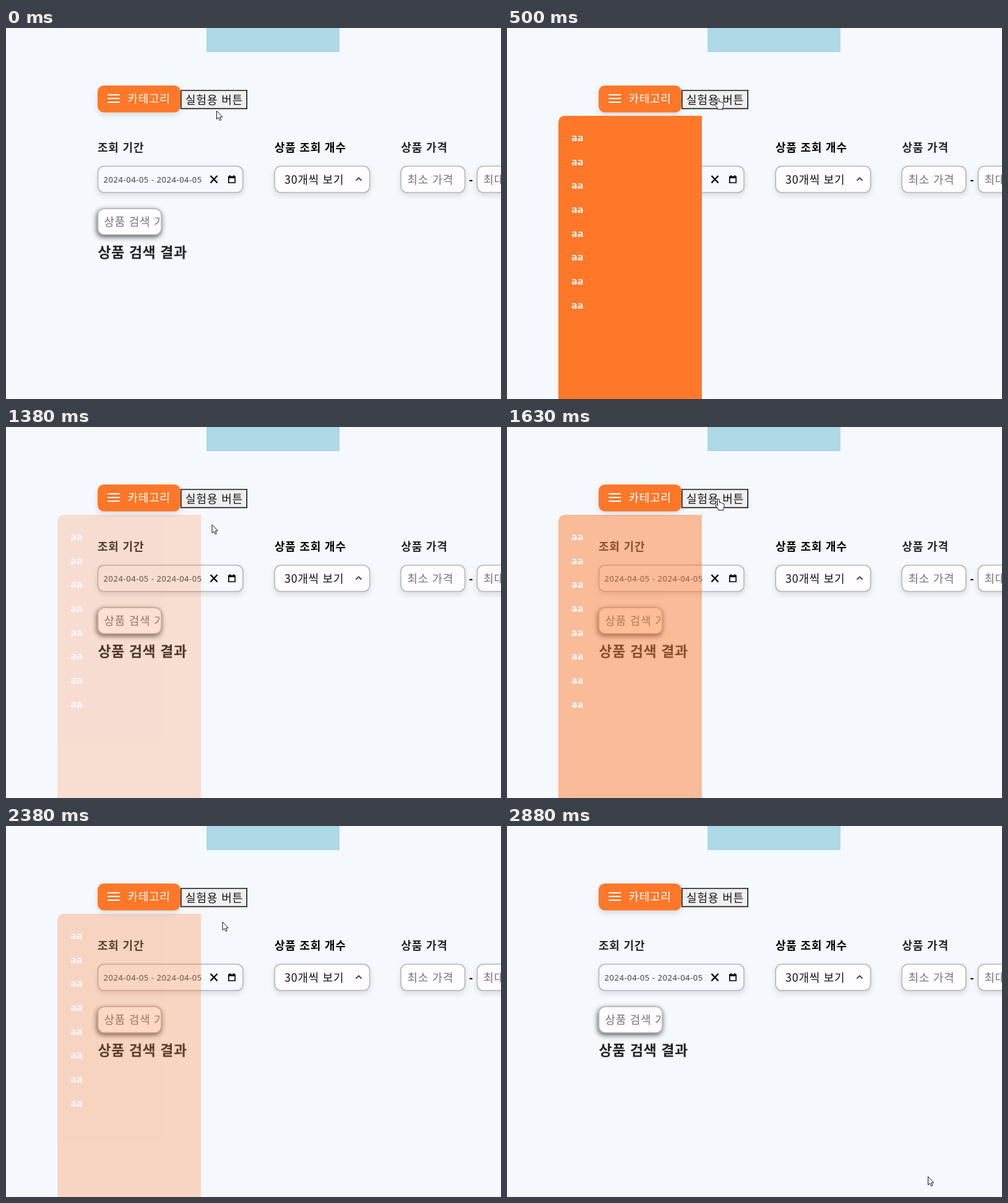
Animation of 800x600 px, one loop 3.01 s. Source, as an HTML page:

```html
<!DOCTYPE html>
<html lang="ko">
<head>
<meta charset="utf-8">
<style>
  html, body { margin: 0; height: 100%; overflow: hidden; background: #f5f9fe; }
  svg { display: block; }
  text { font: 300 18px "Noto Sans CJK KR", "Noto Sans CJK", sans-serif; white-space: pre; letter-spacing: .7px; fill: #111; }
  .label { font-weight: 700; fill: #212529; letter-spacing: .8px; }
  .title { font-size: 23px; letter-spacing: .55px; }
  .hint { fill: #757575; }
  .date { font: 13px "Noto Sans", "Open Sans", sans-serif; fill: #3c4043; letter-spacing: .55px; }
  .dash { font: 600 18px "Noto Sans", sans-serif; }
  .item { font: 600 16px "Noto Sans", "Open Sans", sans-serif; fill: #fff; letter-spacing: 0; }
  .field { fill: #fffdff; stroke: #b4b5b8; stroke-width: 1.6; }
  .soft { filter: drop-shadow(0 4px 5px rgba(0, 0, 0, .12)); }
  .deep { filter: drop-shadow(-1px 3px 4px rgba(0, 0, 0, .65)); }
  .line { fill: none; stroke: #000; stroke-width: 2; }
  .cursor { fill: #fff; stroke: #111; stroke-width: 1; stroke-linejoin: round; }
</style>
</head>
<body>
<svg width="800" height="600" viewBox="0 0 800 600">
  <rect x="324" width="215" height="39" fill="#add8e6"/>

  <rect class="soft" x="148" y="93" width="134" height="43.5" rx="10" fill="#ff782a"/>
  <path class="line" d="M164 108h20M164 114h20M164 120h20" style="stroke:#fff"/>
  <text x="196.5" y="120.500" style="fill:#fff">카테고리</text>

  <rect x="282.800" y="100.800" width="106.400" height="29.600" fill="#efefef" stroke="#111" stroke-width="1.600"/>
  <path class="line" d="M282.800 130V100.800H389" style="stroke:#444;stroke-width:1.600"/>
  <text x="290" y="123" style="letter-spacing:.9px">실험용 버튼</text>

  <text class="label" x="148" y="199.500">조회 기간</text>
  <text class="label" x="434" y="199.500" style="fill:#000">상품 조회 개수</text>
  <text class="label" x="638.500" y="199.500">상품 가격</text>

  <g class="soft">
    <rect class="field" x="148.500" y="223.500" width="234.500" height="42.500" rx="10" style="fill:#f6f9fe"/>
    <rect class="field" x="434.200" y="223.500" width="153.500" height="42.500" rx="10"/>
    <rect class="field" x="638.200" y="223.500" width="103.500" height="42.500" rx="10"/>
    <rect class="field" x="761.500" y="223.500" width="103.500" height="42.500" rx="10"/>
  </g>
  <text class="date" x="157.500" y="249.800">2024-04-05 - 2024-04-05</text>
  <path class="line" d="M330.500 239l11 11.500M341.500 239l-11 11.500" style="stroke-width:2.4"/>
  <path d="M361 238h1.500v1.500h5V238h1.500v1.500h2V251h-12V239.500h2zM360.700 243v6.600h8.700V243z" fill-rule="evenodd"/>
  <text x="450" y="252.300">30개씩 보기</text>
  <path class="line" d="M565.500 246.700l4.500-4.400 4.500 4.400" style="stroke:#444"/>
  <text class="hint" x="648.500" y="251.800">최소 가격</text>
  <text class="dash" x="748.500" y="252">-</text>
  <text class="hint" x="771.500" y="251.800">최대 가격</text>

  <rect class="field deep" x="148.500" y="292.300" width="102.500" height="42" rx="10"/>
  <clipPath id="inner"><rect x="150" y="294" width="98" height="40"/></clipPath>
  <text class="hint" x="158.500" y="320.400" clip-path="url(#inner)">상품 검색 기</text>
  <text class="label title" x="148.500" y="370.500">상품 검색 결과</text>

  <g id="panel">
    <path d="M83 600V152a10 10 0 0 1 10-10H315V600z" fill="#ff782a"/>
  </g>

  <path id="arrow" class="cursor" d="M0 0V13.500L3 10.800 5.200 15.500 7.300 14.600 5.200 10H9.300z"/>
  <path id="hand" class="cursor" d="M-1.500 1.500Q0-.8 1.500 1.500V6.500Q3 5.200 4.200 7 5.700 6 6.700 7.700 8.600 7 9 9.200V13L7.500 16.500V18.500H-.5V17L-4.500 11.800Q-5.500 9.500-3.300 9.500L-1.500 11z"/>
</svg>
<script>
const $ = id => document.getElementById(id);
const LOOP = 3010, TICK = 125, LAST = 23, FADE = 300;
const BUTTON_BOTTOM = 131;

for (let i = 0; i < 8; i++) {
  const item = document.createElementNS("http://www.w3.org/2000/svg", "text");
  item.setAttribute("class", "item");
  item.setAttribute("x", 104);
  item.setAttribute("y", 183 + 38.65 * i);
  item.textContent = "aa";
  $("panel").append(item);
}

// Pointer rests: tick, x, y of the hot spot
const rests = [
  [0, 340.5, 134], [4, 341, 113], [8, 341, 118], [11, 333, 158], [13, 342, 116],
  [15, 342, 126], [17, 342, 126], [19, 350, 155], [21, 350, 158], [LAST, 680.5, 567]
];
// Start times of the fades, in and out by turns
const fades = [170, 1228, 1540, 2246];

const smooth = p => p * p * (3 - 2 * p);

// CSS "ease": cubic-bezier(.25, .1, .25, 1)
function ease(p) {
  const curve = (u, a, b) => 3 * u * (1 - u) ** 2 * a + 3 * u * u * (1 - u) * b + u ** 3;
  let lo = 0, hi = 1;
  for (let i = 0; i < 20; i++) {
    const mid = (lo + hi) / 2;
    if (curve(mid, .25, .25) < p) lo = mid; else hi = mid;
  }
  return curve(lo, .1, 1);
}

function pointer(tick) {
  const i = Math.max(1, rests.findIndex(r => r[0] >= tick));
  const [a, ax, ay] = rests[i - 1], [b, bx, by] = rests[i];
  const p = smooth((tick - a) / (b - a));
  return [ax + (bx - ax) * p, ay + (by - ay) * p];
}

function opacity(time) {
  const done = fades.filter(start => start <= time);
  if (!done.length) return 0;
  const p = ease(Math.min(1, (time - done.at(-1)) / FADE));
  return done.length % 2 ? p : 1 - p;
}

// The screen refreshes eight times a second
function draw(time) {
  const tick = Math.min(LAST, Math.floor(time / TICK));
  const [x, y] = pointer(tick);
  const hover = y < BUTTON_BOTTOM;
  $("panel").style.opacity = opacity(tick * TICK);
  $("arrow").style.display = hover ? "none" : "";
  $("hand").style.display = hover ? "" : "none";
  $(hover ? "hand" : "arrow").setAttribute("transform", `translate(${x} ${y})`);
}

const start = performance.now();
function frame() {
  draw((performance.now() - start) % LOOP);
  requestAnimationFrame(frame);
}
frame();
</script>
</body>
</html>
```
